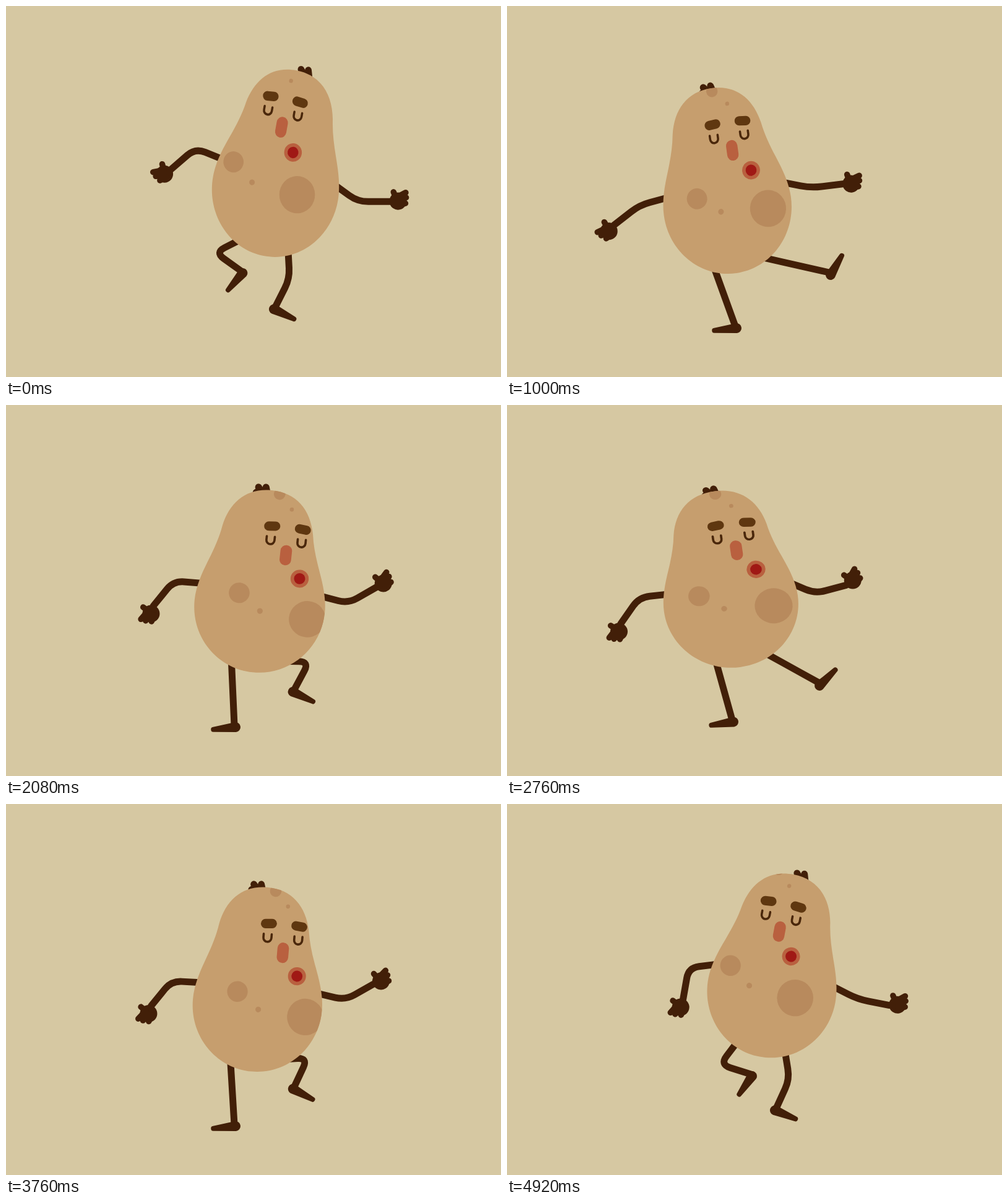
Write an HTML page that moves like this. It is 800 px wide and 600 px high and loops after 4.96 s.

```html
<!DOCTYPE html>
<html lang="en">
<head>
<meta charset="utf-8">
<title>Dancing potato</title>
<style>
  html, body { margin: 0; width: 100%; height: 100%; overflow: hidden; background: #d6c8a2; }
  svg { display: block; width: 100vw; height: 100vh; }
  .limb { fill: none; stroke: #421f08; stroke-width: 11; stroke-linejoin: round; stroke-linecap: round; }
  .solid { fill: #421f08; }
  .spot { fill: #b88a5d; }
  .brow { fill: #5f3710; }
  .eye { fill: none; stroke: #4a270b; stroke-width: 3.6; stroke-linecap: round; }
  .lip { fill: #b9603f; }
</style>
</head>
<body>
<svg viewBox="0 0 800 600">
  <defs>
    <path id="pear" d="M0-190C40-190 65-165 73-125C76-105 82-87 89-68C96-49 105-25 105 0C105 60 58 108 0 108C-58 108-105 60-105 0C-105-25-96-49-89-68C-82-87-76-105-73-125C-65-165-40-190 0-190Z"/>
    <clipPath id="skin"><use href="#pear"/></clipPath>
    <path id="foot" class="solid" d="M0-8L36-4A4 4 0 0 1 36 4L0 8A8 8 0 0 1 0-8Z"/>
    <g id="hand">
      <circle class="solid" cx="13" cy="-2" r="14"/>
      <path class="limb" style="stroke-width:9.5" d="M14 5L28 9M14-2L27 1M13-8L24-8M11 4L9 14"/>
    </g>
    <path id="eye" class="eye" d="M-6.500-6V0A6.500 6.500 0 0 0 6.500 0V-6"/>
    <rect id="brow" class="brow" x="-13" y="-7.500" width="26" height="15" rx="7.500"/>
  </defs>
  <rect width="800" height="600" fill="#d6c8a2"/>
  <path id="legL" class="limb"/><use id="footL" href="#foot"/>
  <path id="legR" class="limb"/><use id="footR" href="#foot"/>
  <path id="armL" class="limb"/><use id="handL" href="#hand"/>
  <path id="armR" class="limb"/><use id="handR" href="#hand"/>
  <g id="body">
    <path id="hair" class="limb" d="M-9 9L-4 5M1 9L-6 0M9 9L6-1"/>
    <use href="#pear" fill="#c69e6e"/>
    <g clip-path="url(#skin)">
      <g id="face">
        <g class="spot">
          <circle cx="47" cy="122" r="29.500"/>
          <circle cx="-66" cy="90.500" r="16.700"/>
          <circle cx="-30" cy="116.500" r="4.600"/>
          <circle cx="4" cy="-53" r="3.300"/>
          <circle cx="-18" cy="-76" r="9.300"/>
        </g>
        <use href="#brow" transform="translate(-24.500 -23) rotate(-5)"/>
        <use href="#brow" transform="translate(25 -22.500) rotate(6)"/>
        <use href="#eye" x="-25"/>
        <use href="#eye" x="25"/>
        <rect class="lip" x="-7.300" y="5.500" width="18.600" height="33" rx="9.300"/>
        <circle class="lip" cx="28" cy="57.700" r="14.600"/>
        <circle cx="28" cy="57.700" r="9" fill="#a01915"/>
      </g>
    </g>
  </g>
</svg>
<script>
const LOOP = 4960, STEP = 40;
const CYCLE = LOOP / 3, HALF = CYCLE / 2;
const MID = 402, GROUND = 433;
const BONE = 52, UPPER = 56, FORE = 52;
const { sin, cos, PI, hypot, max, min, floor, sqrt } = Math;
const RAD = PI / 180;
const $ = id => document.getElementById(id);

// time, body x, face x; repeated mirrored in the second half
const side = [[0, 33.5, -10], [66, 48, -16.5], [270, 41, -19], [440, 6, 32], [787, -26, 7.5]];
const sway = side.concat(side.map(([t, x, fx]) => [t + HALF, -x, -fx]));

// time, ankle x y, toe angle: plant, raise, tuck, swing, kick, drop, plant
const stride = [
  [225, 31, 521, 6], [440, 62, 462, 27], [787, 6, 440, 55], [893, 65, 419, 25],
  [1000, 121, 435, -60], [1107, 103, 454, -45], [1253, 31, 521, 6]
];

// time, upper and lower arm angle below the horizontal
const swingL = [[0, -22, 41], [440, -4, 51], [893, 33, 20], [1000, 15, 38], [1107, 6, 55], [1613, 7, 80]];
const swingR = [[0, 36, 0], [440, 14, -30], [893, -5, 73], [1000, 11, -7], [1107, 23, -15], [1613, 27, 11]];

// Smooth cyclic interpolation that never overshoots a key
function sample(rows, time) {
  const n = rows.length;
  let t = time % CYCLE;
  if (t < rows[0][0]) t += CYCLE;
  let i = n - 1;
  while (rows[i][0] > t) i--;
  const key = (k, c) => rows[(k + n) % n][c] + (c ? 0 : CYCLE * floor(k / n));
  const slope = (k, c) => (key(k + 1, c) - key(k, c)) / (key(k + 1, 0) - key(k, 0));
  const tangent = (k, c) => {
    const a = slope(k - 1, c), b = slope(k, c);
    return a * b <= 0 ? 0 : 2 * a * b / (a + b);
  };
  const span = key(i + 1, 0) - key(i, 0);
  const u = (t - key(i, 0)) / span, v = 1 - u;
  return rows[0].slice(1).map((_, k) => {
    const c = k + 1;
    return v * v * (1 + 2 * u) * key(i, c) + u * u * (3 - 2 * u) * key(i + 1, c)
      + span * u * v * (v * tangent(i, c) - u * tangent(i + 1, c));
  });
}

// Ballistic arc around a peak time, repeating every period
function hop(t, peak, reach, height, period) {
  let d = (t - peak) % period;
  if (d > period / 2) d -= period;
  if (d < -period / 2) d += period;
  return height * max(0, 1 - (d / reach) ** 2);
}
const bigHop = (t, period) => hop(t, 12, 125, 31, period);

function toward(from, to, dist) {
  const dx = to[0] - from[0], dy = to[1] - from[1];
  const k = min(.5, dist / (hypot(dx, dy) || 1));
  return [from[0] + dx * k, from[1] + dy * k];
}

function limb(id, root, joint, end) {
  $(id).setAttribute('d',
    `M${root}L${toward(joint, root, 17)}Q${joint} ${toward(joint, end, 17)}L${end}`);
}

// Knee of a two-bone leg, bent outwards
function knee(hip, ankle, s) {
  const dx = ankle[0] - hip[0], dy = ankle[1] - hip[1], d = hypot(dx, dy);
  const bend = s * sqrt(max(0, BONE ** 2 - d * d / 4)) / d;
  return [hip[0] + dx / 2 + dy * bend, hip[1] + dy / 2 - dx * bend];
}

const reach = ([x, y], s, angle, len) =>
  [x + s * len * cos(angle * RAD), y + len * sin(angle * RAD)];

const place = (id, value) => $(id).setAttribute('transform', value);

function draw(t) {
  const a = 2 * PI * t / CYCLE;
  const [x, fx] = sample(sway, t);
  const tilt = 10.65 * cos(a - .4) + 2.3 * cos(3 * a + 1.22);
  const sy = 1 + .018 * cos(2 * a) + .028 * sin(4 * a + .2), sx = 1 / sy;
  const lift = bigHop(t, HALF);
  const cx = MID + x;
  const cy = GROUND - .88 * lift - hop(t, 345, 82, 22, HALF) - 108 * sy;
  const c = cos(tilt * RAD), n = sin(tilt * RAD);
  const onBody = (px, py) => [cx + sx * (px * c - py * n), cy + sy * (px * n + py * c)];

  place('body', `translate(${cx} ${cy}) scale(${sx} ${sy}) rotate(${tilt})`);
  place('face', `translate(${fx} ${-109 - lift / 3})`);
  place('hair', `translate(${6 - .7 * fx} -193)`);

  const flick = { L: -16 * cos(2 * a + .44), R: 20 * sin(4 * a) - 12 };
  for (const [name, s, swing] of [['L', -1, swingL], ['R', 1, swingR]]) {
    const legTime = s > 0 ? t : t + HALF;
    const [ax, ay, toe] = sample(stride, legTime);
    const up = bigHop(legTime, CYCLE);
    const heel = [MID + s * ax, ay - up];
    const ankle = [heel[0] + s * 2, heel[1] - 3];
    const hip = onBody(s * 37, 86);
    limb('leg' + name, hip, knee(hip, ankle, s), ankle);
    place('foot' + name, `translate(${heel}) scale(${s} 1) rotate(${toe + .65 * up})`);

    const [upper, fore] = sample(swing, t);
    const shoulder = onBody(s * 86, -28);
    const elbow = reach(shoulder, s, upper, UPPER);
    const wrist = reach(elbow, s, fore, FORE);
    limb('arm' + name, shoulder, elbow, wrist);
    place('hand' + name, `translate(${wrist}) scale(${s} 1) rotate(${fore + flick[name]}) scale(1 -1)`);
  }
}

function tick() {
  draw(floor(performance.now() % LOOP / STEP) * STEP);
  requestAnimationFrame(tick);
}
tick();
</script>
</body>
</html>
```
